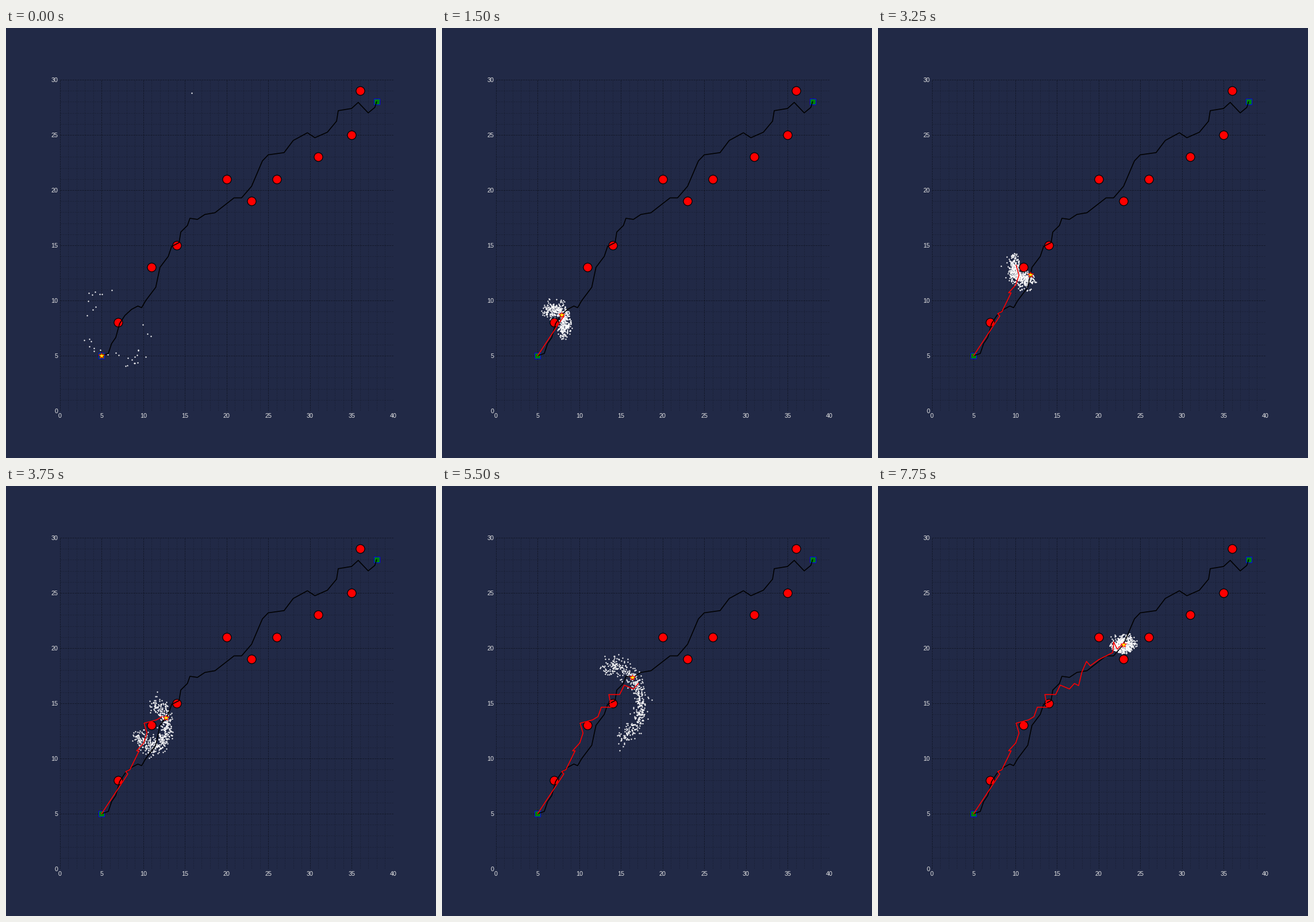
A matplotlib script for the animation above (8000 ms loop, 748 by 748 pixels).

```python
import numpy as np
import matplotlib.pyplot as plt
from matplotlib.animation import FuncAnimation
from matplotlib.ticker import MultipleLocator

SIZE, DPI = 748, 64
FRAMES, STEP = 32, 250
FIRST_FIX = 6            # step at which the estimate starts
SPEED = 0.832            # robot travel per step, in axis units
BACK = "#212946"

LANDMARKS = np.array([(7, 8), (11, 13), (14, 15), (20, 21), (23, 19),
                      (26, 21), (31, 23), (35, 25), (36, 29)])

# corners of the true route and of the estimated one
ROUTE = np.array([
    (5, 5), (5.8, 5.2), (6.2, 6.1), (6.7, 6.65), (7.15, 7.9), (7.8, 8.65),
    (8.6, 9.2), (9.35, 9.5), (9.8, 9.35), (10.3, 10), (11.5, 11.2),
    (12, 13), (13, 14), (13.4, 14.9), (14.3, 15.25), (14.5, 16.2),
    (15.3, 16.8), (15.6, 17.45), (16.5, 17.35), (17.4, 17.8), (18.6, 17.95),
    (20.9, 19.3), (21.8, 19.3), (23, 20.35), (24.3, 22.65), (25, 23.2),
    (26.9, 23.4), (28, 24.5), (29.7, 25.2), (30.6, 24.75), (32.1, 25.25),
    (33.2, 26.25), (33.4, 27.2), (35, 27.4), (35.8, 27.95), (37, 27),
    (37.8, 27.5), (38, 28)])
ESTIMATE = np.array([
    (5, 5), (8.15, 8.6), (7.9, 8.8), (8.4, 9), (9.5, 10.7), (9.2, 10.7),
    (10.05, 11.4), (10.45, 12.3), (10.1, 13.2), (11.6, 13.5), (12.25, 13.8),
    (12.65, 14.65), (13.85, 14.65), (13.55, 15.8), (14.85, 15.8),
    (15.4, 16.65), (16.5, 16.3), (17.1, 16.8), (17.6, 16.6), (18, 17.85),
    (18.55, 18.8), (19, 18.4), (20, 18.95), (21.7, 19.6), (21.8, 20.55),
    (22.25, 19.9), (22.75, 20.3)])

# angular half-width of the cloud and its lag behind the robot, in degrees
KEY_STEPS = [0, 6, 13, 18, 22, 26, 31]
HALF_WIDTH = [180, 110, 105, 180, 100, 42, 55]
LAG = [0, -5, 95, 0, 28, 0, 0]


def px(v):
    """Pixels to points."""
    return v * 72 / DPI


def robot_at(step):
    """The robot drives the route at constant speed."""
    legs = np.hypot(*np.diff(ROUTE, axis=0).T)
    along = np.concatenate([[0], np.cumsum(legs)])
    return np.array([np.interp(SPEED * step, along, c) for c in ROUTE.T])


def particles(step):
    """Guesses lie on an arc around the landmark nearest to the robot."""
    rng = np.random.default_rng(40 + step)
    n = 450 if step else 36
    offsets = robot_at(step) - LANDMARKS
    near = np.argmin(np.hypot(*offsets.T))
    dx, dy = offsets[near]
    half = np.interp(step, KEY_STEPS, HALF_WIDTH)
    lag = np.interp(step, KEY_STEPS, LAG)
    swing = half * (2 * rng.beta(1.5, 1.5, n) - 1) - lag
    angle = np.arctan2(dy, dx) + np.radians(swing)
    radius = np.hypot(np.hypot(dx, dy), 0.7) + rng.normal(0, 0.4, n)
    cloud = LANDMARKS[near] + np.column_stack(
        [radius * np.cos(angle), radius * np.sin(angle)])
    if step == 0:
        cloud[0] = 15.8, 28.8     # a lone stray guess
    return cloud


plt.rcParams["font.family"] = "Liberation Sans"
fig = plt.figure(figsize=(SIZE / DPI, SIZE / DPI), dpi=DPI, facecolor=BACK)
ax = fig.add_axes([0.1255, 0.1096, 0.775, 0.77], facecolor=BACK)
ax.set(xlim=(0, 40), ylim=(0, 30))
ax.set_axisbelow(True)
for side in ax.spines.values():
    side.set_visible(False)
for axis in (ax.xaxis, ax.yaxis):
    axis.set_major_locator(MultipleLocator(5))
    axis.set_minor_locator(MultipleLocator(1))
ax.tick_params(which="both", length=0, pad=px(3.5), labelsize=px(10.8),
               labelcolor="0.9")
for which, alpha in (("major", 0.5), ("minor", 0.2)):
    ax.grid(which=which, color="k", ls="--", lw=px(0.8), alpha=alpha)

ax.plot(*LANDMARKS.T, "o", ms=px(15), mfc="red", mec="black", mew=px(1.2),
        zorder=2)
ax.plot(*ROUTE[[0, -1]].T, "s", ms=px(10), mfc="green", mec="blue",
        mew=px(1), zorder=2)
ax.plot(*ROUTE.T, color="black", lw=px(1.6), zorder=3)

dots, = ax.plot([], [], "o", ms=px(2.3), mfc="white", mew=0, zorder=1.5)
trail, = ax.plot([], [], color="red", lw=px(1.6), zorder=4)
robot, = ax.plot([], [], "*", ms=px(10), mfc="yellow", mec="red",
                 mew=px(1), zorder=5)


def draw(step):
    dots.set_data(*particles(step).T)
    fixes = max(0, step - FIRST_FIX + 1)
    trail.set_data(*ESTIMATE[:fixes + 1].T)
    robot.set_data(*robot_at(step)[:, None])
    return dots, trail, robot


anim = FuncAnimation(fig, draw, frames=FRAMES, interval=STEP, repeat=True,
                     repeat_delay=0)
plt.show()
```
